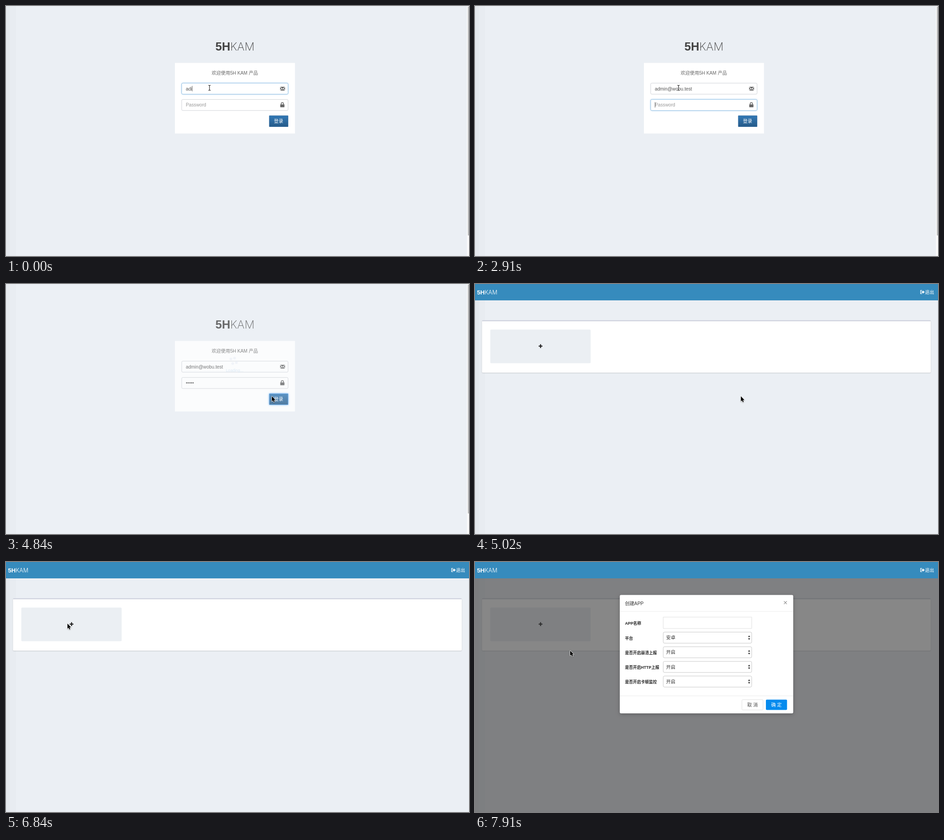
Animation of 1017 by 550 pixels, one loop 8000 ms. Source, as an HTML page with a canvas:

```html
<!DOCTYPE html>
<html lang="zh">
<head>
<meta charset="utf-8">
<title>Login and create app</title>
<style>
html, body { margin: 0; width: 100%; height: 100%; overflow: hidden; }
canvas { display: block; }
</style>
</head>
<body>
<canvas id="stage" width="1017" height="550"></canvas>
<script>
const g = document.getElementById('stage').getContext('2d');
const LOOP = 8000, PAGE = '#ebeff4';
const SANS = '"Liberation Sans", "Noto Sans CJK SC", "Noto Sans CJK", sans-serif';
const LIGHT = 'Inter, Roboto, sans-serif';
const BRAND = ['5H', 'KAM'], EMAIL = 'admin@wobu.test';

const clamp = (v, lo, hi) => Math.max(lo, Math.min(hi, v));

// Number of letters typed by time t, one letter at a time from `first` to `last`
const typed = (t, start, end, first, last) => t < start ? first - 1
  : Math.floor(first + (last - first) * clamp((t - start) / (end - start), 0, 1));

function emailText(t) {
  if (t < 110) return 'adi';
  const length = t < 1040 ? typed(t, 440, 680, 3, 5)
    : t < 1830 ? typed(t, 1040, 1830, 6, 11)
    : typed(t, 1830, 2430, 11, 15);
  return EMAIL.slice(0, length);
}

// Position on a cubic curve, advancing in equal visible steps; the first shows at `start`
function glide(t, start, end, steps, [a, b, c, d]) {
  const stepTime = (end - start) / (steps - 1);
  const s = clamp(Math.floor((t - start) / stepTime) + 1, 0, steps) / steps, r = 1 - s;
  return [0, 1].map(i =>
    r * r * r * a[i] + 3 * r * r * s * b[i] + 3 * r * s * s * c[i] + s * s * s * d[i]);
}

function text(s, x, y, size, color, { align = 'left', weight = 400, family = SANS } = {}) {
  g.font = `${weight} ${size}px ${family}`;
  g.fillStyle = color;
  g.textAlign = align;
  g.fillText(s, x, y + size * 0.36);
  return g.measureText(s).width;
}

function shadow(color, blur, dy = 0) {
  g.shadowColor = color;
  g.shadowBlur = blur;
  g.shadowOffsetY = dy;
}
const noShadow = () => shadow('transparent', 0);

// An active shadow belongs to the fill only
function box(x, y, w, h, fill, stroke, r = 0) {
  g.beginPath();
  g.roundRect(x, y, w, h, r);
  if (fill) { g.fillStyle = fill; g.fill(); }
  noShadow();
  if (stroke) { g.strokeStyle = stroke; g.lineWidth = 0.8; g.stroke(); }
}

function shape(points, fill, stroke, width = 1) {
  g.beginPath();
  points.forEach(([x, y]) => g.lineTo(x, y));
  if (stroke) { g.strokeStyle = stroke; g.lineWidth = width; g.stroke(); }
  if (fill) { g.closePath(); g.fillStyle = fill; g.fill(); }
}

function cross(x, y, r, color, width) {
  for (const d of [-r, r]) shape([[x - r, y - d], [x + r, y + d]], null, color, width);
}

function brand(x, y, size, color, weight) {
  const w = text(BRAND[0], x, y, size, color, { weight: 700 });
  text(BRAND[1], x + w, y, size * 0.96, color, { weight, family: LIGHT });
}

function background() {
  box(0, 0, 1017, 550, PAGE);
  box(0, 0, 22, 550, '#e8ecf1');
  box(0, 0, 8, 550, '#e4e8ed');
}

function arrow([x, y]) {
  g.save();
  g.translate(x, y);
  g.lineJoin = 'round';
  const outline = [[0, 0], [0, 11.2], [2.5, 8.9], [4.3, 12.9], [6.2, 12], [4.5, 8.2], [7.9, 8.2], [0, 0]];
  shadow('rgba(0,0,0,.3)', 2, 1);
  shape(outline, null, '#fff', 1.6);
  noShadow();
  shape(outline, '#000');
  g.restore();
}

function beam([x, y]) {
  for (const [color, width] of [['rgba(255,255,255,.8)', 2.4], ['#111', 1.1]]) {
    shape([[x, y - 5], [x, y + 5]], null, color, width);
    for (const d of [-1, 1])
      shape([[x - 2.5, y + d * 5.8], [x, y + d * 5], [x + 2.5, y + d * 5.8]], null, color, width);
  }
}

function field(y, focus) {
  box(385.9, y, 233.7, 24.3, '#fff', '#c3c7cd', 2.5);
  g.globalAlpha = focus;
  shadow('rgba(102,175,233,.45)', 4);
  box(385.9, y, 233.7, 24.3, '#fff', '#7db6e4', 2.5);
  g.globalAlpha = 1;
}

const caret = (x, y) => box(x, y - 6, 0.8, 12, '#444');

function envelope(x, y) {
  box(x - 5.5, y - 4.2, 11, 8.4, '#666', null, 0.5);
  shape([[x - 5.5, y - 3.8], [x, y + 1], [x + 5.5, y - 3.8]], null, '#fff', 1.1);
  for (const d of [-1, 1])
    shape([[x + d * 5.5, y + 3.6], [x + d * 1.8, y - 0.2]], null, '#fff', 1.1);
}

function lock(x, y) {
  box(x - 4.6, y - 1, 9.2, 6.2, '#666', null, 0.7);
  g.beginPath();
  g.arc(x, y - 2.3, 2.6, Math.PI, 0);
  g.lineTo(x + 2.6, y);
  g.moveTo(x - 2.6, y - 2.3);
  g.lineTo(x - 2.6, y);
  g.strokeStyle = '#666';
  g.lineWidth = 1.5;
  g.stroke();
}

function loginButton(focused) {
  const fill = g.createLinearGradient(0, 241, 0, 266);
  fill.addColorStop(0, '#3279b6');
  fill.addColorStop(1, '#265a88');
  if (focused) shadow('#3d97ee', 4);
  box(578.3, 241.3, 41.3, 24.2, fill, focused ? '#4a9ae6' : '#28629a', 0.5);
  text('登录', 598.7, 253.4, 10.2, '#fff', { align: 'center' });
}

function loading() {
  g.globalAlpha = 0.22;
  box(0, 0, 1012, 550, PAGE);
  g.globalAlpha = 1;
  for (let i = 0; i < 4; i++)
    box(491 + 4 * i, 162 + (i % 2 ? 11 : 0) - i, 6, 6, '#f1f4f9', null, 3);
  text('Loading...', 483, 190, 8.74, '#dbe8f5');
}

function loginPointer(t) {
  const from = [447, 180], to = [584, 247];
  const spot = glide(t, 3990, 4460, 5, [from, from, to, to]);
  const overField = [181.8, 217.7].some(y => Math.abs(spot[1] - y) < 12);
  (overField ? beam : arrow)(spot);
}

function loginPage(t) {
  background();
  box(1012.5, 0, 5, 550, '#fafafa');
  box(1014.6, 1, 2.4, 504, '#b4b5b6', null, 1.2);

  brand(460, 89.3, 25.5, '#444', 200);
  box(371, 125.3, 263.7, 155.2, '#fff');
  text(`欢迎使用${BRAND.join(' ')} 产品`, 502.6, 147.2, 10.2, '#666', { align: 'center' });

  // focus fades from the email to the password, then to the button
  const emailFocus = t < 2790 ? 1 : t < 2910 ? 0.5 : 0;
  const passFocus = t < 4580 ? 1 - emailFocus : t < 4700 ? 0.5 : 0;
  field(169.7, emailFocus);
  field(205.6, passFocus);
  envelope(607.5, 181.9);
  lock(607, 217.5);

  const emailWidth = text(emailText(t), 395, 182, 10.2, '#555');
  if (emailFocus === 1) caret(395 + emailWidth, 181.8);

  const dots = typed(t, 3270, 3750, 1, 5);
  const dotsWidth = text('•'.repeat(dots), 395, 217.8, 10.2, '#555');
  if (!dots) text('Password', 395, 217.8, 10.2, '#999');
  if (passFocus && t < 4580) caret(395 + dotsWidth, 217.6);

  loginButton(t >= 4580);
  if (t >= 4840) loading();
  loginPointer(t);
}

function appsPage() {
  background();
  shadow('rgba(0,0,0,.16)', 2, 1);
  box(15.4, 80, 985.6, 115, '#fff', null, 2);
  box(15.4, 79.7, 985.6, 2.2, '#d0d3de', null, [2, 2, 0, 0]);
  box(33.6, 100.2, 220.4, 74, '#ebeff3', null, 2);
  box(139.8, 135.4, 8.4, 2.4, '#222', null, 0.5);
  box(142.8, 132.4, 2.4, 8.4, '#222', null, 0.5);
}

function header() {
  box(0, 0, 1017, 36, '#368bbd');
  brand(4.5, 18.2, 13.1, '#fff', 300);
  shape([[982, 14.2], [978.8, 14.2], [978.8, 21.4], [982, 21.4]], null, '#fff', 1.3);
  box(980.8, 16.4, 3, 2.8, '#fff');
  shape([[983.6, 14], [987.6, 17.8], [983.6, 21.6]], '#fff');
  text('退出', 988, 18, 10.2, '#fff');
}

function select(y, value) {
  box(413.4, y - 12.2, 194.4, 24.4, '#fff', '#b9b9b9', 3);
  text(value, 419.8, y + 0.2, 10.2, '#333');
  for (const d of [-1, 1])
    shape([[599.8, y + d * 1.3], [604.4, y + d * 1.3], [602.1, y + d * 5]], '#333');
}

function dialogButton(x, label, fill, stroke, color) {
  box(x, 302.8, 46.4, 22.8, fill, stroke, 2);
  text(label, x + 23.2, 314.2, 10.2, color, { align: 'center', weight: 500 });
}

function dialog(opening) {
  g.save();
  if (opening) {
    // grows out of the clicked spot
    g.translate(138, 132);
    g.scale(0.975, 0.975);
    g.translate(-138, -132);
    g.globalAlpha = 0.97;
  }
  shadow('rgba(0,0,0,.25)', 9, 2);
  box(318, 72.6, 381, 260.5, '#fff', null, 3);
  for (const y of [108.4, 294.3]) box(318, y, 381, 0.8, '#e6e6e6');
  text('创建APP', 329.5, 91, 10.2, '#333', { weight: 500 });
  cross(681.8, 89.4, 3.2, '#888', 1.1);

  ['APP名称', '平台', '是否开启崩溃上报', '是否开启HTTP上报', '是否开启卡顿监控'].forEach((label, i) => {
    const y = 134.2 + 32.2 * i;
    text(label, 329.5, y + 1, 8.74, '#222', { weight: 700 });
    if (i) select(y, i === 1 ? '安卓' : '开启');
    else box(413.4, y - 13, 194.4, 25, '#fff', '#d9d9d9');
  });

  dialogButton(586.3, '取 消', '#fff', '#d9d9d9', '#444');
  dialogButton(639, '确 定', '#068bee', null, '#fff');
  g.restore();
}

function draw(t) {
  if (t < 5020) return loginPage(t);
  const opened = t >= 7460, opening = t < 7700;
  appsPage();
  if (opened) box(0, 36, 1017, 514, `rgba(55,55,55,${opening ? 0.55 : 0.6})`);
  header();
  if (opened) dialog(opening);
  arrow(t >= 7910 ? [209, 195]
    : glide(t, 5910, 6600, 6, [[584, 247], [770, 140], [300, 50], [135, 135.5]]));
}

function tick() {
  draw(performance.now() % LOOP);
  requestAnimationFrame(tick);
}
tick();
</script>
</body>
</html>
```
